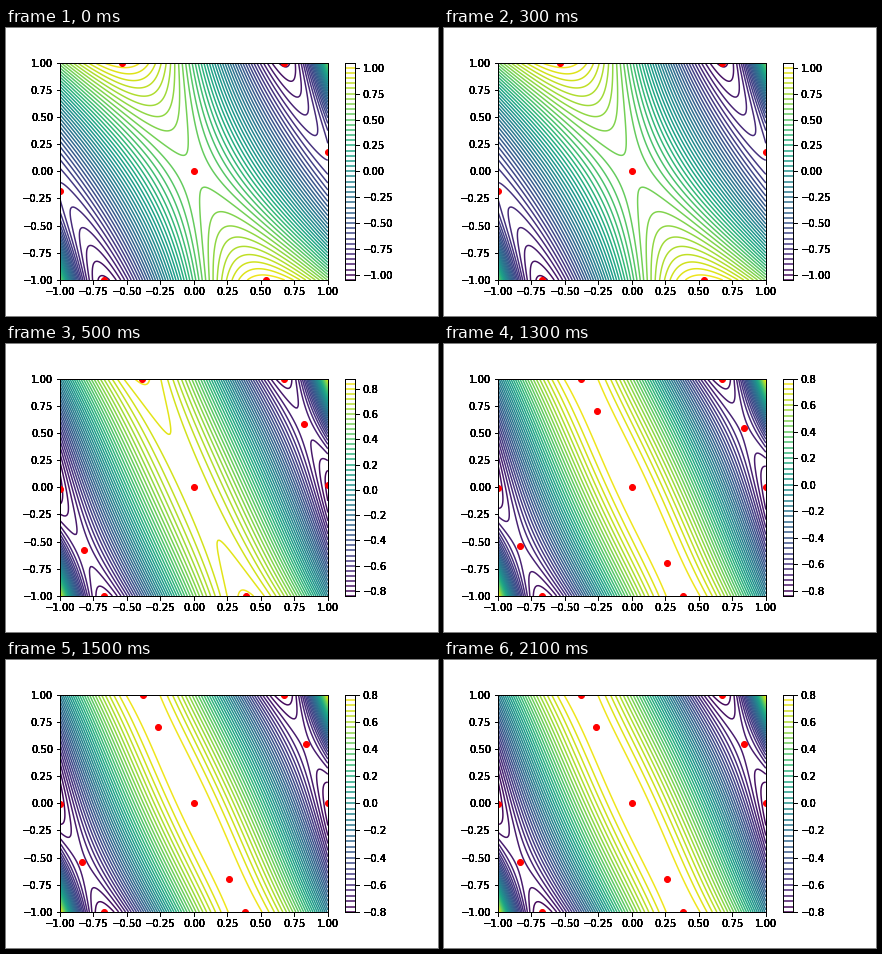
Recreate the animation shown at these times as a matplotlib script. Size 432x288 px, loop 2500 ms.

```python
import numpy as np
import matplotlib.pyplot as plt
from matplotlib.animation import FuncAnimation
from matplotlib.ticker import MaxNLocator

plt.rcParams.update({"font.family": "DejaVu Sans", "font.size": 10})

LEFT, BOTTOM, TOP = 0.125, 0.125, 0.88
WIDTH, HEIGHT = 0.775, TOP - BOTTOM
MAIN = (LEFT, BOTTOM, 0.8 * WIDTH, HEIGHT)
BAR = (LEFT + 0.85 * WIDTH, BOTTOM, HEIGHT * 4 / 6 / 20, HEIGHT)

STEPS = 4
FRAMES = 5
SIGNS = np.array([1, 1, 1, -1, -1])
START = [(0, 0), (1, 1), (-1, 1), (0.4, 1), (1, 0.5)]


def function(x, y):
    return np.exp(x**2 + x * y)


def basis(x, y):
    return np.array([x**0, x**2, x * y, y**2])


def fit(points):
    """Quadratic whose error alternates with equal size at the points."""
    x, y = np.array(points, float).T
    system = np.column_stack([basis(x, y).T, SIGNS])
    return np.linalg.solve(system, function(x, y))[:4]


def error(coeffs, x, y):
    return function(x, y) - np.tensordot(coeffs, basis(x, y), 1)


def gradient(coeffs, x, y):
    _, a, b, d = coeffs
    f = function(x, y)
    return (2 * x + y) * f - 2 * a * x - b * y, x * f - b * x - 2 * d * y


def roots(t, values):
    i = np.nonzero(values[:-1] * values[1:] < 0)[0]
    return t[i] - values[i] * (t[i + 1] - t[i]) / (values[i + 1] - values[i])


def edge_extrema(coeffs):
    t = np.linspace(-1, 1, 4000)
    one = np.ones_like(t)
    top = [(x, 1) for x in roots(t, gradient(coeffs, t, one)[0])]
    right = [(1, y) for y in roots(t, gradient(coeffs, one, t)[1])]
    return top + right


def inner_extrema(coeffs):
    """Newton's method from a coarse grid of starting points."""
    _, a, b, d = coeffs
    side = np.linspace(-0.96, 0.96, 17)
    x, y = (grid.ravel() for grid in np.meshgrid(side, side))
    for _ in range(40):
        f, gx, gy = function(x, y), *gradient(coeffs, x, y)
        slope = 2 * x + y
        xx = (2 + slope**2) * f - 2 * a
        xy = (1 + x * slope) * f - b
        yy = x**2 * f - 2 * d
        det = xx * yy - xy**2
        x, y = (np.clip(x - (yy * gx - xy * gy) / det, -1.2, 1.2),
                np.clip(y - (xx * gy - xy * gx) / det, -1.2, 1.2))
    gx, gy = gradient(coeffs, x, y)
    inside = (np.maximum(abs(x), abs(y)) < 0.999) & (np.hypot(gx, gy) < 1e-8)
    found = np.column_stack([x, y])[inside]
    return np.unique(found.round(4) + 0.0, axis=0)


def exchange():
    """Refit repeatedly, moving the reference points to the new extrema."""
    points, fits = START, []
    for _ in range(STEPS):
        coeffs = fit(points)
        fits.append(coeffs)
        points = START[:2] + edge_extrema(coeffs)
    return fits


FITS = exchange()
X, Y = np.meshgrid(np.linspace(-1, 1, 201), np.linspace(-1, 1, 201))
fig = plt.figure(figsize=(6, 4), dpi=72, facecolor="white")


def add_main():
    ticks = np.linspace(-1, 1, 9)
    return fig.add_axes(MAIN, facecolor="none", xlim=(-1, 1), ylim=(-1, 1),
                        xticks=ticks, yticks=ticks)


def add_bar(levels):
    ax = fig.add_axes(BAR, facecolor="none", xlim=(0, 1), xticks=[],
                      ylim=(levels[0], levels[-1]))
    ax.yaxis.set_major_locator(MaxNLocator(9, steps=[1, 2, 2.5, 5, 10]))
    ax.yaxis.tick_right()
    return ax


def draw(frame):
    fig.clear()
    coeffs = FITS[min(frame, STEPS - 1)]

    ax = add_main()
    lines = ax.contour(X, Y, error(coeffs, X, Y), 50, cmap="viridis",
                       linewidths=1.5)
    edge = np.array(edge_extrema(coeffs))
    dots = np.vstack([inner_extrema(coeffs), edge, -edge])
    ax.plot(*dots.T, "ro", markersize=6)
    ax.set(xlim=(-1, 1), ylim=(-1, 1))

    levels = lines.levels
    bar = add_bar(levels)
    colors = lines.cmap((levels - levels[0]) / (levels[-1] - levels[0]))
    bar.hlines(levels, 0, 1, colors=colors, linewidth=1.5)
    bar.set_ylim(levels[0], levels[-1])

    # Repeated axes give the labels their heavy edges
    for _ in range(7):
        add_main()
        add_bar(levels)
    return fig.axes


anim = FuncAnimation(fig, draw, frames=FRAMES, init_func=lambda: [],
                     interval=500, repeat=True, repeat_delay=0, blit=False)
plt.show()
```
